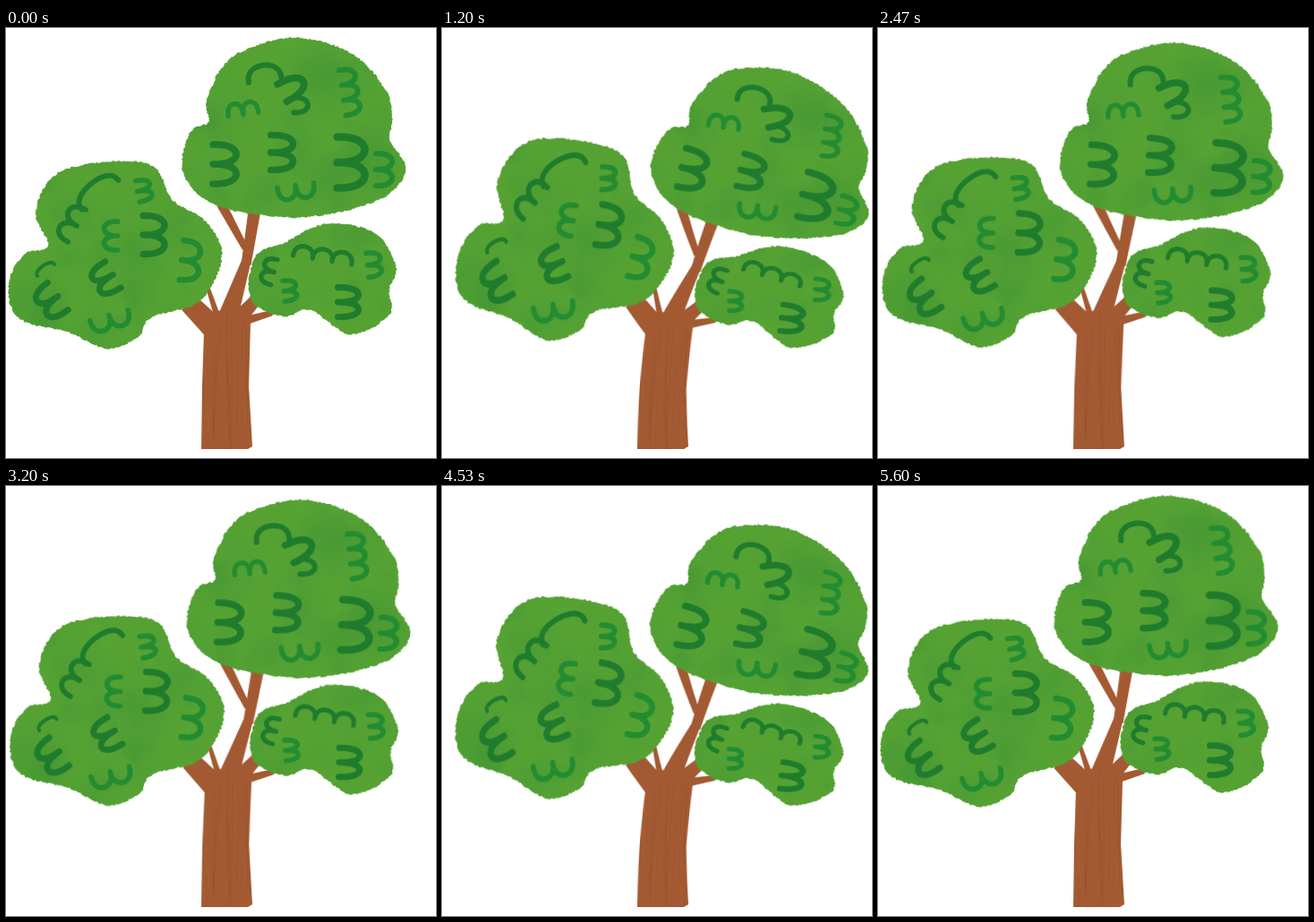
These frames come from a looping animation (480x480 px, 5660 ms). An HTML page with a canvas:

```html
<!DOCTYPE html>
<html lang="en">
<head>
<meta charset="utf-8">
<title>Swaying tree</title>
<style>
html, body { margin: 0; width: 100%; height: 100%; overflow: hidden; background: #fff; }
canvas { display: block; }
</style>
</head>
<body>
<canvas id="stage" width="480" height="480"></canvas>
<script>
const SIZE = 480, LOOP = 5660, BASE_X = 247, BASE_Y = 470;
const MAX_BEND = 0.00078, MAX_SQUASH = 0.015;
const DARK = '#207c2d', MID = '#238c31', LEAF = '#55a233', BARK = '#a35a33';

let seed = 7;
const rand = () => (seed = (seed * 16807) % 2147483647) / 2147483647;
const jitter = a => (rand() - 0.5) * 2 * a;

const art = document.createElement('canvas');
art.width = art.height = SIZE;
const g = art.getContext('2d', { willReadFrequently: true });
g.fillStyle = '#fff';
g.fillRect(0, 0, SIZE, SIZE);
g.lineCap = g.lineJoin = 'round';

const pairs = list => list.trim().split(/\s+/).map(p => p.split(',').map(Number));

function polygon(pts) {
  const path = new Path2D();
  for (const [x, y] of pts) path.lineTo(x, y);
  path.closePath();
  return path;
}

// Closed smooth curve through key points, with a torn-paper edge
function roughOutline(pts) {
  const n = pts.length, edge = [];
  pts.forEach((b, i) => {
    const a = pts[(i + n - 1) % n], c = pts[(i + 1) % n], d = pts[(i + 2) % n];
    const steps = Math.ceil(Math.hypot(c[0] - b[0], c[1] - b[1]) / 1.8);
    for (let s = 0; s < steps; s++) {
      const t = s / steps;
      edge.push([0, 1].map(j => jitter(0.9) + b[j] + 0.5 * t * (c[j] - a[j]
        + t * (2 * a[j] - 5 * b[j] + 4 * c[j] - d[j] + t * (3 * (b[j] - c[j]) + d[j] - a[j])))));
    }
  });
  return polygon(edge);
}

function crown(outline) {
  const pts = pairs(outline), path = roughOutline(pts);
  const [x, y, right, bottom] = [Math.min, Math.max].flatMap(f => [0, 1].map(j => f(...pts.map(p => p[j]))));
  const area = (right - x) * (bottom - y);
  const blotch = (r, rgb, alpha) => {
    const bx = x + rand() * (right - x), by = y + rand() * (bottom - y);
    const fill = g.createRadialGradient(bx, by, r * 0.2, bx, by, r);
    fill.addColorStop(0, `rgba(${rgb},${alpha})`);
    fill.addColorStop(1, `rgba(${rgb},0)`);
    g.fillStyle = fill;
    g.fillRect(bx - r, by - r, 2 * r, 2 * r);
  };
  g.save();
  g.fillStyle = LEAF;
  g.fill(path);
  g.clip(path);
  for (let i = 0; i < area / 3500; i++) blotch(22 + rand() * 22, '62,146,52', 0.28);
  for (let i = 0; i < area / 450; i++) blotch(5 + rand() * 12, i % 2 ? '62,146,52' : '92,168,56', 0.13);
  g.restore();
}

// A row of half-round bumps: centre, depth, length, direction of the bulge
function bumps(color, x, y, depth, length, turn = 0, count = 2) {
  g.save();
  g.translate(x, y);
  g.rotate(turn);
  g.beginPath();
  for (let i = 0; i < count; i++) {
    for (let s = 0; s <= 16; s++) {
      const a = s / 16 * Math.PI;
      g.lineTo(depth * (Math.max(0, Math.sin(a)) ** 0.75 - 0.5),
        length * ((i + (1 - Math.cos(a)) / 2) / count - 0.5));
    }
  }
  g.strokeStyle = color;
  g.lineWidth = 3 + depth * 0.18;
  g.stroke();
  g.restore();
}

// Tapered limb between two points
function branch(x1, y1, w1, x2, y2, w2) {
  const len = Math.hypot(x2 - x1, y2 - y1) * 2, nx = (y1 - y2) / len, ny = (x2 - x1) / len;
  g.fillStyle = BARK;
  g.fill(polygon([[x1 + nx * w1, y1 + ny * w1], [x2 + nx * w2, y2 + ny * w2],
    [x2 - nx * w2, y2 - ny * w2], [x1 - nx * w1, y1 - ny * w1]]));
}

function drawTrunk() {
  branch(224, 286, 4, 236, 322, 7);
  branch(240, 196, 11, 267, 246, 7);
  branch(278, 200, 14, 268, 264, 11);
  branch(269, 258, 10, 248, 322, 22);
  branch(204, 307, 22, 231, 334, 26);
  branch(280, 302, 13, 262, 322, 17);
  branch(297, 318, 6, 266, 327, 10);
  const trunk = polygon(pairs('218,470 219,400 221,338 236,316 262,312 273,328 271,400 275,467 270,470'));
  g.fill(trunk);
  g.save();
  g.clip(trunk);
  for (let i = 0; i < 50; i++) {
    g.fillStyle = i % 2 ? 'rgba(133,70,38,.2)' : 'rgba(181,106,62,.2)';
    g.fillRect(219 + rand() * 55, 315 + rand() * 120, 1, 20 + rand() * 70);
  }
  g.restore();
}

function drawTop() {
  crown(`226,105 224,80 252,33 318,11 385,28 424,70 431,102 429,126 446,157 425,187
    370,206 310,211 235,198 198,163 205,117`);
  bumps(DARK, 288, 50, 17, 37, -1.7, 1);
  bumps(DARK, 320, 66, 27, 22, -0.5, 1);
  bumps(DARK, 329, 86, 16, 17, 0, 1);
  bumps(DARK, 244, 152, 26, 44);
  bumps(DARK, 308, 139, 25, 39);
  bumps(DARK, 385, 150, 31, 57);
  bumps(MID, 264, 90, 13, 34, -1.7);
  bumps(MID, 384, 71, 17, 51, -0.15, 3);
  bumps(MID, 422, 158, 18, 36);
  bumps(MID, 324, 183, 15, 41, 1.45);
}

function drawLeft() {
  crown(`47,243 33,205 58,162 120,149 165,155 186,192 222,215 241,255 216,305 162,323
    147,345 113,358 70,340 14,324 3,285 20,253`);
  bumps(DARK, 100, 180, 16, 52, -2.25, 1);
  bumps(DARK, 72, 217, 16, 41, -2.63);
  bumps(DARK, 43, 268, 6, 23, -2.17, 1);
  bumps(DARK, 165, 231, 24, 43);
  bumps(DARK, 110, 281, 22, 34, 2.6);
  bumps(DARK, 49, 306, 22, 38, 2.5);
  bumps(MID, 154, 181, 15, 24, -0.2);
  bumps(MID, 117, 232, 15, 32, 3.14);
  bumps(MID, 206, 260, 20, 44, 0.1);
  bumps(MID, 117, 328, 15, 44, 1.3);
}

function drawRight() {
  crown('271,285 281,252 310,240 355,219 410,228 435,265 428,292 428,320 385,342 340,315 310,322 278,309');
  bumps(DARK, 354, 253, 12, 66, -1.42, 3);
  bumps(DARK, 293, 271, 13, 29, 3.4);
  bumps(DARK, 382, 306, 23, 33);
  bumps(MID, 411, 264, 15, 27, -0.1);
  bumps(MID, 317, 293, 14, 23, -0.1);
}

drawTrunk();
drawTop();
drawLeft();
drawRight();

const src = g.getImageData(0, 0, SIZE, SIZE).data;
const stage = document.getElementById('stage').getContext('2d');
const out = stage.createImageData(SIZE, SIZE);

// Bend the picture into an arc rooted at the trunk's foot, slightly shortened
function bend(k, height) {
  const px = out.data, radius = 1 / k, row = SIZE * 4;
  px.fill(255);
  for (let y = 0, o = 0; y < SIZE; y++) {
    for (let x = 0; x < SIZE; x++, o += 4) {
      const dx = BASE_X + radius - x, dy = BASE_Y - y;
      const sx = BASE_X + radius - Math.sqrt(dx * dx + dy * dy);
      const sy = BASE_Y - Math.atan2(dy, dx) * radius / height;
      if (sx < 0 || sy < 0 || sx >= SIZE - 1 || sy >= SIZE - 1) continue;
      const ix = sx | 0, iy = sy | 0, fx = sx - ix, fy = sy - iy;
      const i = iy * row + ix * 4;
      for (let c = i; c < i + 3; c++) {
        const top = src[c] + (src[c + 4] - src[c]) * fx;
        const low = src[c + row] + (src[c + row + 4] - src[c + row]) * fx;
        px[o + c - i] = top + (low - top) * fy;
      }
    }
  }
  stage.putImageData(out, 0, 0);
}

// Fifteen steps per 600 ms, the first one held longer
function stepAt(t) {
  const u = t % 600;
  return 15 * Math.floor(t / 600) + (u < 70 ? 0 : 1 + Math.floor((u - 70) / 38));
}

let shown = -1;
function frame() {
  const step = stepAt(performance.now() % LOOP);
  if (step !== shown) {
    shown = step;
    const sway = (1 - Math.cos(step / 141 * 4 * Math.PI)) / 2;
    bend(Math.max(1e-6, MAX_BEND * sway), 1 - MAX_SQUASH * sway);
  }
  requestAnimationFrame(frame);
}
frame();
</script>
</body>
</html>
```
